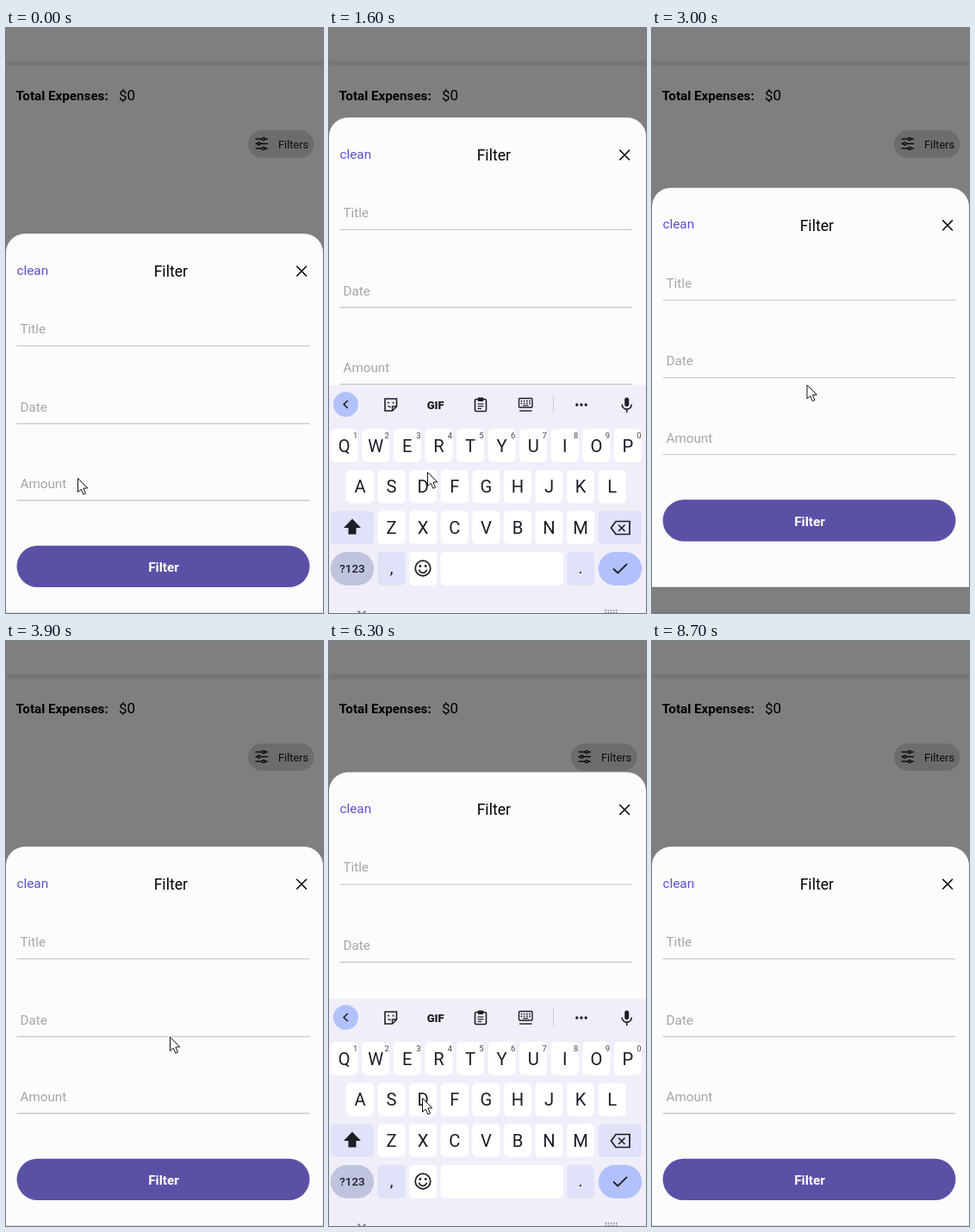
An HTML page with a canvas that plays this animation: 368 px wide and 680 px high, repeating every 9.9 s.

```html
<!DOCTYPE html>
<html lang="en">
<head>
<meta charset="utf-8">
<title>Expense filter</title>
<style>
html, body { margin: 0; width: 100%; height: 100%; overflow: hidden; background: #7f7f7f; }
canvas { display: block; width: 368px; height: 680px; }
</style>
</head>
<body>
<canvas id="stage"></canvas>
<script>
const W = 368, H = 680, LOOP = 9900, STEP = 100;
const canvas = document.getElementById('stage');
const ctx = canvas.getContext('2d');
const dpr = window.devicePixelRatio || 1;
canvas.width = W * dpr;
canvas.height = H * dpr;

// Keyboard sessions: sheet lift in px, and start times of each move
const sessions = [
  { lift: 135, kbIn: 760, up: 900, kbOut: 2450, down: 2700 },
  { lift: 143, kbIn: 5860, up: 6000, kbOut: 7350, down: 7600 }
];
const SLIDE = 540, KB_IN = 300, KB_OUT = 320, KB_H = 265;

// Pointer path: time, x, y
const path = [
  [0, 83, 523], [400, 114, 516], [1700, 114, 516], [2300, 329, 631],
  [2600, 329, 631], [3000, 179.5, 414.5], [3300, 160, 400], [3600, 160, 400],
  [4000, 200, 480], [4100, 200, 480], [4700, 326, 627], [4800, 326, 627],
  [5200, 238.5, 597], [5500, 108, 531], [6800, 108, 531], [7100, 329, 635],
  [7600, 329, 635], [8300, 279, 596], [8600, 129, 348]
];
const POINTER_END = 8700;

const clamp = v => Math.max(0, Math.min(1, v));
const easeInOut = t => t < 0.5 ? 2 * t * t : 1 - 2 * (1 - t) * (1 - t);
const easeOut = t => 1 - (1 - t) ** 3;

function rect(x, y, w, h, fill, r = 0) {
  ctx.fillStyle = fill;
  ctx.beginPath();
  ctx.roundRect(x, y, w, h, r);
  ctx.fill();
}

function disc(x, y, r, fill) {
  ctx.fillStyle = fill;
  ctx.beginPath();
  ctx.arc(x, y, r, 0, Math.PI * 2);
  ctx.fill();
}

function ring(x, y, r, color, width) {
  ctx.strokeStyle = color;
  ctx.lineWidth = width;
  ctx.beginPath();
  ctx.arc(x, y, r, 0, Math.PI * 2);
  ctx.stroke();
}

function line(points, color, width, close) {
  ctx.strokeStyle = color;
  ctx.lineWidth = width;
  ctx.beginPath();
  for (let i = 0; i < points.length; i += 2) ctx.lineTo(points[i], points[i + 1]);
  if (close) ctx.closePath();
  ctx.stroke();
}

function text(str, x, y, size, color, weight = 400, align = 'left') {
  ctx.font = `${weight} ${size}px Roboto, sans-serif`;
  ctx.fillStyle = color;
  ctx.textAlign = align;
  ctx.fillText(str, x, y);
}

function drawPage() {
  rect(0, 0, W, H, '#7f7f7f');
  rect(0, 38, W, 6, '#757575');
  rect(0, 38, W, 2, '#797979');
  text('Total Expenses:', 11.5, 83.5, 15.2, '#000', 700);
  text('$0', 131, 84, 17, '#000');

  rect(281, 119, 76.5, 32, '#6c6c6c', 16);
  [[129, 299], [134.5, 293.5], [140, 299]].forEach(([y, knob]) => {
    line([289.5, y, 304, y], '#000', 1.3);
    disc(knob, y, 2.2, '#000');
    disc(knob, y, 0.9, '#6c6c6c');
  });
  text('Filters', 316, 139.5, 12.8, '#0c0c0c');

  disc(182.5, 604, 26.5, '#2c2884');
  line([174, 604, 191, 604], '#858585', 2.2);
  line([182.5, 595.5, 182.5, 612.5], '#858585', 2.2);
  text('Home', 77, 646.5, 12.6, '#2f2a8c', 400, 'center');
  text('Profile', 289, 646.5, 12.6, '#262626', 400, 'center');
}

function drawSheet(lift) {
  ctx.save();
  ctx.translate(0, -lift);
  rect(0, 239, W, 464, '#fcfcfc', [22, 22, 0, 0]);
  text('clean', 12.5, 286.5, 15.3, '#5a50d6');
  text('Filter', 191.3, 289, 17.6, '#000', 400, 'center');
  line([337.3, 276.7, 349, 288.5], '#000', 1.5);
  line([349, 276.7, 337.3, 288.5], '#000', 1.5);
  [['Title', 355, 369], ['Date', 445.5, 459.3], ['Amount', 535, 548.6]].forEach(([label, base, y]) => {
    text(label, 16.5, base, 15.2, '#a5a5a5');
    rect(12.5, y, 340, 1.1, '#c3c3c3');
  });
  rect(12.5, 601.7, 340, 48.3, '#5a51a7', 24.2);
  text('Filter', 183, 632, 15.4, '#fff', 700, 'center');
  ctx.restore();
}

const INK = '#1c1d25', KEY = '#ffffff', SIDE = '#dfe2f8', ACCENT = '#b1c1fb';

function drawToolbar(collapsed) {
  disc(19.5, 437.5, 14.5, ACCENT);
  const d = collapsed ? -1 : 1;
  line([19.5 + 2.3 * d, 433, 19.5 - 2.3 * d, 437.5, 19.5 + 2.3 * d, 442], INK, 1.6);

  ctx.fillStyle = INK;
  ctx.beginPath();
  ctx.roundRect(343.2, 429.5, 5, 10.5, 2.5);
  ctx.fill();
  ctx.strokeStyle = INK;
  ctx.lineWidth = 1.6;
  ctx.beginPath();
  ctx.arc(345.7, 437.5, 5.6, 0, Math.PI);
  ctx.stroke();
  line([345.7, 443, 345.7, 447], INK, 1.6);
  if (collapsed) return;

  // Sticker
  line([65, 431, 78.5, 431, 78.5, 440, 73.5, 445, 65, 445], INK, 1.6, true);
  line([78.5, 440, 73.5, 440, 73.5, 445], INK, 1.3);
  disc(69, 435.5, 1, INK);
  disc(74.5, 435.5, 1, INK);
  line([68.5, 439, 70, 440.5, 72, 440.5], INK, 1.2);

  text('GIF', 123.7, 442.7, 13, INK, 900, 'center');

  // Clipboard
  ctx.lineWidth = 1.6;
  ctx.beginPath();
  ctx.roundRect(169.5, 431.5, 13, 14, 1.5);
  ctx.stroke();
  rect(172.7, 429.5, 6.6, 4.5, INK, 1);
  [437, 439.7, 442.4].forEach((y, i) => line([172.5, y, i < 2 ? 179.5 : 177, y], INK, 1.2));

  // Keyboard switch
  ctx.lineWidth = 1.4;
  ctx.beginPath();
  ctx.roundRect(220.5, 430.5, 15.5, 10.5, 1);
  ctx.stroke();
  for (let i = 0; i < 4; i++) {
    rect(222.7 + i * 3.2, 432.8, 1.6, 1.6, INK);
    rect(222.7 + i * 3.2, 435.6, 1.6, 1.6, INK);
  }
  rect(225, 438.2, 6.5, 1.2, INK);
  line([221, 445, 235.5, 445], INK, 1.4);

  rect(260, 428, 1, 20, '#c8c9d4');
  [287.8, 293, 298.2].forEach(x => disc(x, 438, 1.7, INK));
}

function drawKeyboard(offset, alpha, collapsed) {
  ctx.save();
  ctx.globalAlpha = alpha;
  ctx.translate(0, offset);
  rect(0, 415.5, W, KB_H, '#f0eff9');
  drawToolbar(collapsed);

  const pitch = 36.58, keyW = 32;
  [['QWERTYUIOP', 1.7, 466], ['ASDFGHJKL', 20, 513.7], ['ZXCVBNM', 56.6, 561.3]].forEach(([row, x0, y], r) => {
    [...row].forEach((ch, i) => {
      const x = x0 + i * pitch;
      rect(x, y, keyW, 38.5, KEY, 5);
      text(ch, x + keyW / 2, y + 26.6, 20.2, INK, 400, 'center');
      if (!r) text((i + 1) % 10, x + 29, y + 11, 9.5, '#44454e', 400, 'center');
    });
  });

  // Shift and backspace
  rect(1.7, 561.3, 50.5, 38.5, SIDE, 5);
  ctx.fillStyle = INK;
  ctx.beginPath();
  [[27, 570.5], [37, 581], [31.5, 581], [31.5, 588.5], [22.5, 588.5], [22.5, 581], [17, 581]]
    .forEach(p => ctx.lineTo(...p));
  ctx.fill();
  rect(312.7, 561.3, 50.5, 38.5, SIDE, 5);
  line([333, 573.5, 349, 573.5, 349, 588.5, 333, 588.5, 327.5, 581], INK, 1.7, true);
  line([336, 577.5, 343.5, 585], INK, 1.6);
  line([343.5, 577.5, 336, 585], INK, 1.6);

  // Bottom row
  rect(1.7, 609, 50.5, 39, '#bfc3de', 19.5);
  text('?123', 27, 633, 13.4, INK, 500, 'center');
  rect(56.6, 609, keyW, 39, SIDE, 5);
  text(',', 72.6, 634, 19, INK, 400, 'center');
  rect(93.2, 609, keyW, 39, KEY, 5);
  ring(109, 628, 8.8, INK, 1.7);
  disc(105.8, 625.5, 1.4, INK);
  disc(112.2, 625.5, 1.4, INK);
  ctx.beginPath();
  ctx.arc(109, 628.8, 4.5, 0.2, Math.PI - 0.2);
  ctx.stroke();
  rect(129.7, 609, 142, 39, KEY, 5);
  rect(276, 609, keyW, 39, SIDE, 5);
  text('.', 292, 634, 19, INK, 400, 'center');
  rect(312.7, 609, 50.5, 39, ACCENT, 19.5);
  line([330, 628.5, 335.3, 633.5, 346, 622.8], INK, 1.8);

  line([33.5, 677.5, 38, 682, 42.5, 677.5], '#5d5e66', 1.4);
  for (let i = 0; i < 5; i++) {
    rect(320.5 + i * 3.1, 676, 1.5, 1.5, '#7b7c84');
    rect(320.5 + i * 3.1, 678.8, 1.5, 1.2, '#7b7c84');
  }
  ctx.restore();
}

function drawPointer(t) {
  if (t >= POINTER_END) return;
  let i = path.findIndex(p => p[0] > t);
  if (i < 0) i = path.length - 1;
  const a = path[i - 1], b = path[i];
  const k = clamp((t - a[0]) / (b[0] - a[0]));
  ctx.save();
  ctx.translate(a[1] + (b[1] - a[1]) * k + 0.5, a[2] + (b[2] - a[2]) * k + 0.5);
  ctx.beginPath();
  [[0, 0], [0, 16], [3.7, 12.7], [6.4, 18.7], [9, 17.5], [6.4, 11.6], [11.3, 11.3]]
    .forEach(p => ctx.lineTo(...p));
  ctx.closePath();
  ctx.fillStyle = '#fff';
  ctx.fill();
  ctx.strokeStyle = '#111';
  ctx.lineWidth = 1;
  ctx.stroke();
  ctx.restore();
}

function render(t) {
  ctx.setTransform(dpr, 0, 0, dpr, 0, 0);
  const s = t < 4500 ? sessions[0] : sessions[1];
  const slide = start => easeInOut(clamp((t - start) / SLIDE));
  drawPage();
  drawSheet(s.lift * (slide(s.up) - slide(s.down)));
  rect(0, 679, W, 1, 'rgba(0,0,0,0.12)');

  const inK = clamp((t - s.kbIn) / KB_IN);
  const outK = clamp((t - s.kbOut) / KB_OUT);
  if (inK > 0 && outK < 1) {
    const offset = KB_H * (1 - easeOut(inK) + outK ** 1.55);
    drawKeyboard(offset, easeOut(inK) * (1 - outK) ** 1.4, outK > 0);
  }
  drawPointer(t);
}

const start = performance.now();
function tick() {
  const t = (performance.now() - start) % LOOP;
  render(Math.floor(t / STEP) * STEP);
  requestAnimationFrame(tick);
}
tick();
</script>
</body>
</html>
```
